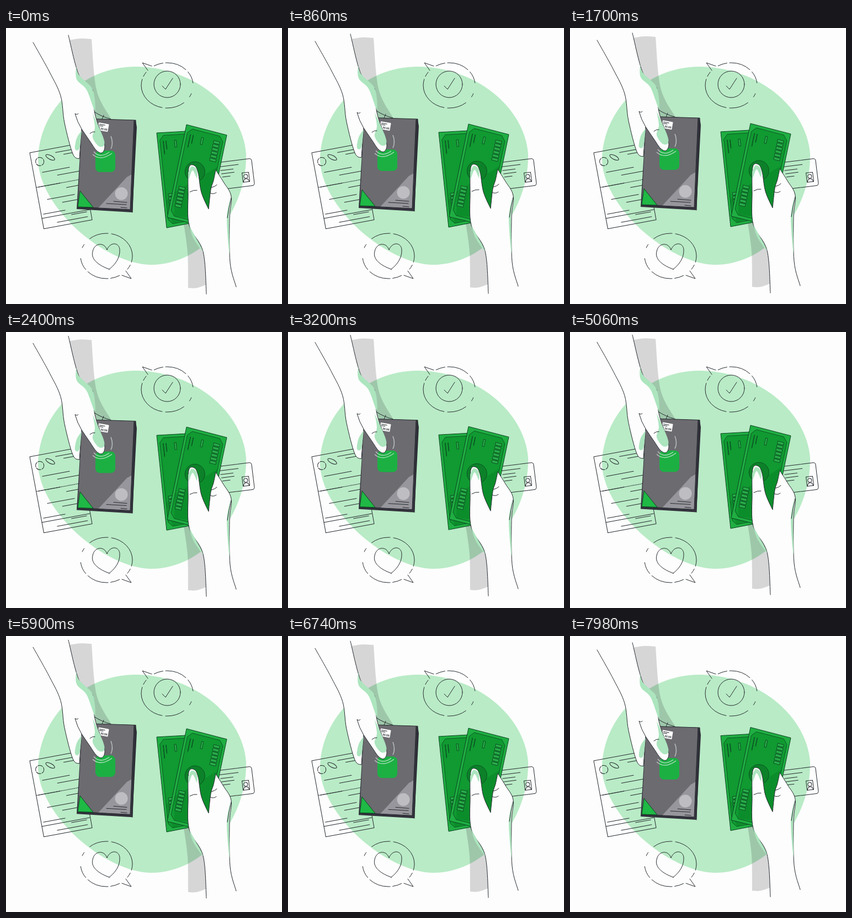
Write an HTML page that moves like this. It is 500 px wide and 500 px high and loops after 8 s.

```html
<!DOCTYPE html>
<html lang="en">
<head>
<meta charset="utf-8">
<title>Hand to hand purchase</title>
<style>
  html, body { margin: 0; width: 100%; height: 100%; overflow: hidden; background: #fdfdfd; }
  svg { display: block; width: 100vw; height: 100vh; }
  .line { fill: none; stroke: #262b30; stroke-width: 1; stroke-linecap: round; stroke-linejoin: round; }
  .skin { fill: #fdfdfd; }
  .shade { fill: #ace5be; }
  .cast { fill: #2a2a30; opacity: .19; }
  .bill { fill: #1fae42; stroke: #0d4422; }
  .inner { fill: #109a31; stroke: #0d4f22; stroke-width: .9; }
  .mark { fill: #28ae49; stroke: #0d4422; stroke-width: .9; }
  .band { fill: #056d20; opacity: .3; }
  .seal { fill: #0c8129; stroke: #0d4422; stroke-width: .8; }
  text { font: bold 5px "Liberation Sans", Arial, sans-serif; fill: #262b30; }
</style>
</head>
<body>
<svg viewBox="0 0 500 500">
  <path fill="#b9ebc6" d="M58 237C60 148 138 70 235 70C340 71 428 143 435 228C437 330 360 429 262 429C176 427 58 322 58 237Z"/>

  <g id="bubbles" class="line"></g>
  <g class="line">
    <circle cx="292" cy="102" r="24"/>
    <path d="M283 105L289 111L302 91"/>
    <path d="M187 437C170 431 153 420 157 405C160 389 178 387 183 402C188 388 204 387 206 401C207 418 196 430 187 437Z"/>
  </g>

  <g class="line" transform="translate(43 226) rotate(-10.5)">
    <path d="M0 0H90L89 140H0Z"/>
    <circle cx="15" cy="19" r="7.5" stroke-dasharray="9 2"/>
    <ellipse cx="35" cy="15" rx="9" ry="3.5" transform="rotate(38 35 15)"/>
    <g id="rows"></g>
    <path d="M1 64H90" stroke-dasharray="1.5 1.5"/>
  </g>

  <g class="line" transform="translate(374 245) rotate(-7)">
    <rect width="71" height="49" rx="4"/>
    <path d="M12 8H46M13 15H36M14 21H37M15 27H29"/>
    <g transform="translate(51 24)">
      <rect width="12" height="17"/>
      <circle cx="6" cy="7" r="3.5"/>
      <path d="M1 17Q1 12 6 11Q11 12 11 17"/>
    </g>
  </g>

  <g id="seller">
    <path class="cast" data-curve="114 22, 135 19, 155 20 | 155 20, 164 112, 190 164 | 190 164, 161 165, 157 112, 132 85, 114 22"/>
    <path fill="#33323c" d="M138 164L235 167L237 180L229 334L128 328Z"/>
    <path fill="#6c6b70" d="M138 164L232 167L225 329L130 324Z"/>
    <path fill="#97969c" d="M167 326L219 270L228 265L225 329Z"/>
    <path class="line" d="M138 164L235 167L229 334M232 168L225 329L130 324M177 158L174 165M160 152Q174 161 190 165"/>
    <path fill="#1fb945" stroke="#0d4422" d="M134 295L158 325L130 324Z"/>
    <rect x="162" y="222" width="36" height="39" rx="8" fill="#1cb043"/>
    <circle cx="209" cy="300" r="11.5" fill="#bebec2"/>
    <path class="line" d="M182 318L218 320M195 314L219 316M208 325L219 326"/>
    <g transform="translate(168 171) rotate(10)">
      <rect class="skin" width="19" height="14" rx="1"/>
      <path class="line" d="M2 3H12M2 5.5H9"/>
      <text x="1" y="12">$ 30.50</text>
    </g>

    <path class="skin line" style="fill: #fdfdfd" data-curve="49 26, 79 80, 99 123, 106 172, 121 228, 133 237 | 133 237, 137 183 | 137 183, 152 205, 164 222, 174 226, 179 215, 174 195, 161 155, 157 112 | 157 112, 132 85, 113 13"/>
    <path class="shade" data-curve="127 69, 132 85, 157 112, 161 150, 146 112, 128 93, 127 69"/>
    <path class="shade" data-curve="157 155, 175 195, 178 212, 168 214, 157 198, 161 180, 157 155"/>
    <path class="shade" data-curve="137 186, 133 218, 125 219, 128 200, 137 186"/>
    <path class="line" d="M137 183Q129 170 125 155Q129 158 131 155M152 191Q157 187 161 188"/>
    <path fill="none" stroke="#e4efe8" stroke-width="1.5" opacity=".65" d="M159 224Q170 237 187 225M157 229Q171 242 192 227M190 196Q195 209 190 219"/>
  </g>

  <g id="buyer">
    <path class="cast" data-curve="322 355, 332 352 | 332 352, 357 405, 363 465 | 363 465, 345 471, 330 471 | 330 471, 329 407, 322 355"/>
    <g id="bills"></g>
    <path class="line" style="fill: #fdfdfd" data-curve="363 482, 357 405, 332 358, 330 300, 331 254, 341 249, 348 262, 354 298, 367 328 | 367 328, 370 299 | 370 299, 372 288, 376 276, 380 257 | 380 257, 394 279, 408 305, 405 345, 406 425, 417 469"/>
    <path class="shade" data-curve="407 306, 400 345, 405 410, 404 345, 407 306"/>
    <path class="shade" data-curve="332 358, 357 405, 340 382, 332 358"/>
    <path class="shade" data-curve="330 262, 336 251, 345 256, 346 272, 338 258, 331 274, 330 262"/>
    <path class="line" d="M408 308Q404 324 401 344M333 297Q340 293 346 294M370 299Q376 302 381 298M372 289Q378 288 382 284"/>
  </g>
</svg>

<script>
const $ = id => document.getElementById(id);
const times = (n, make) => Array.from({ length: n }, (_, i) => make(i)).join('');

// Smooth line through key points; "|" marks a sharp corner
function curve(text) {
  const runs = text.split('|').map(run => run.split(',').map(p => p.trim().split(' ').map(Number)));
  const bend = (p, from, to, k) => p.map((c, i) => (c + k * (to[i] - from[i]) / 6).toFixed(1)).join(' ');
  return 'M' + runs[0][0].join(' ') + runs.map(pts => pts.slice(1).map((b, i) => {
    const a = pts[i], before = pts[i - 1] || a, after = pts[i + 2] || b;
    return `C${bend(a, before, b, 1)} ${bend(b, a, after, -1)} ${b.join(' ')}`;
  }).join('')).join('');
}

document.querySelectorAll('[data-curve]').forEach(el => el.setAttribute('d', curve(el.dataset.curve)));

const bubble = (x, y, turn) => `<g transform="translate(${x} ${y}) rotate(${turn})">
  <ellipse rx="47" ry="41" pathLength="360" stroke-dashoffset="-20"
    stroke-dasharray="9 19 46 8 93 7 12 24 22 6 52 7 29 26"/>
  <path d="M-35 -27L-45 -41L-28 -35"/></g>`;
$('bubbles').innerHTML = bubble(292, 104, 0) + bubble(182, 413, 180);

// Pairs of receipt entries: a long rule, and a short one at the right
$('rows').innerHTML = times(4, i => {
  const y = 39 + i * 25;
  return `<path d="M${i % 2 ? 4 : 16} ${y}H${i % 2 ? 44 : 66}M${42 + i % 2 * 12} ${y + 10}H82"/>`;
}) + '<path d="M0 121H88M26 133H82M46 8H82M60 14H82"/>';

// A banknote laid out in unit coordinates between four corners
function bill([tl, tr, br, bl]) {
  const mix = (a, b, k) => a + (b - a) * k;
  const point = (u, v) => [0, 1].map(i => mix(mix(tl[i], tr[i], u), mix(bl[i], br[i], u), v));
  const poly = (cls, pts) => `<path class="${cls}" d="M${pts.map(p => point(...p).join(' ')).join('L')}Z"/>`;
  const box = (cls, u, v, w, h) => poly(cls, [[u, v], [u + w, v], [u + w, v + h], [u, v + h]]);
  const [cx, cy] = point(.43, .46);
  return box('bill', 0, 0, 1, 1)
    + poly('inner', [[.16, .03], [.84, .03], [.94, .08], [.94, .92], [.84, .97], [.16, .97], [.06, .92], [.06, .08]])
    + poly('band', [[.06, .72], [.94, .35], [.94, .92], [.16, .97]])
    + times(6, i => box('mark', .72, .09 + i * .038, .15, .027) + box('mark', .13, .65 + i * .038, .15, .027))
    + box('mark', .42, .09, .045, .075)
    + box('mark', .14, .09, .005, .14) + box('mark', .21, .09, .005, .09)
    + `<circle class="seal" cx="${cx}" cy="${cy}" r="18"/>`;
}

const front = [[327, 175], [400, 194], [365, 361], [292, 343]];
const back = [[273, 190], [345, 186], [363, 348], [291, 362]];
$('bills').innerHTML = bill(back).replace(/<circle.*/, '') + bill(front);

// Poses advance in threes: two quick ones, then a held one
const LOOP = 8000, BEAT = 140, QUICK = 20;
function poseAt(ms) {
  const t = ms + QUICK;
  return 3 * Math.floor(t / BEAT) + Math.min(2, Math.floor(t % BEAT / QUICK)) - 1;
}

const shift = (id, y) => $(id).setAttribute('transform', `translate(0 ${y.toFixed(2)})`);
const start = performance.now();

function draw() {
  const pose = poseAt((performance.now() - start) % LOOP);
  shift('seller', -9.6 * (1 - Math.abs(1 - pose / 90)));
  shift('buyer', -pose / 18);
  requestAnimationFrame(draw);
}
draw();
</script>
</body>
</html>
```
